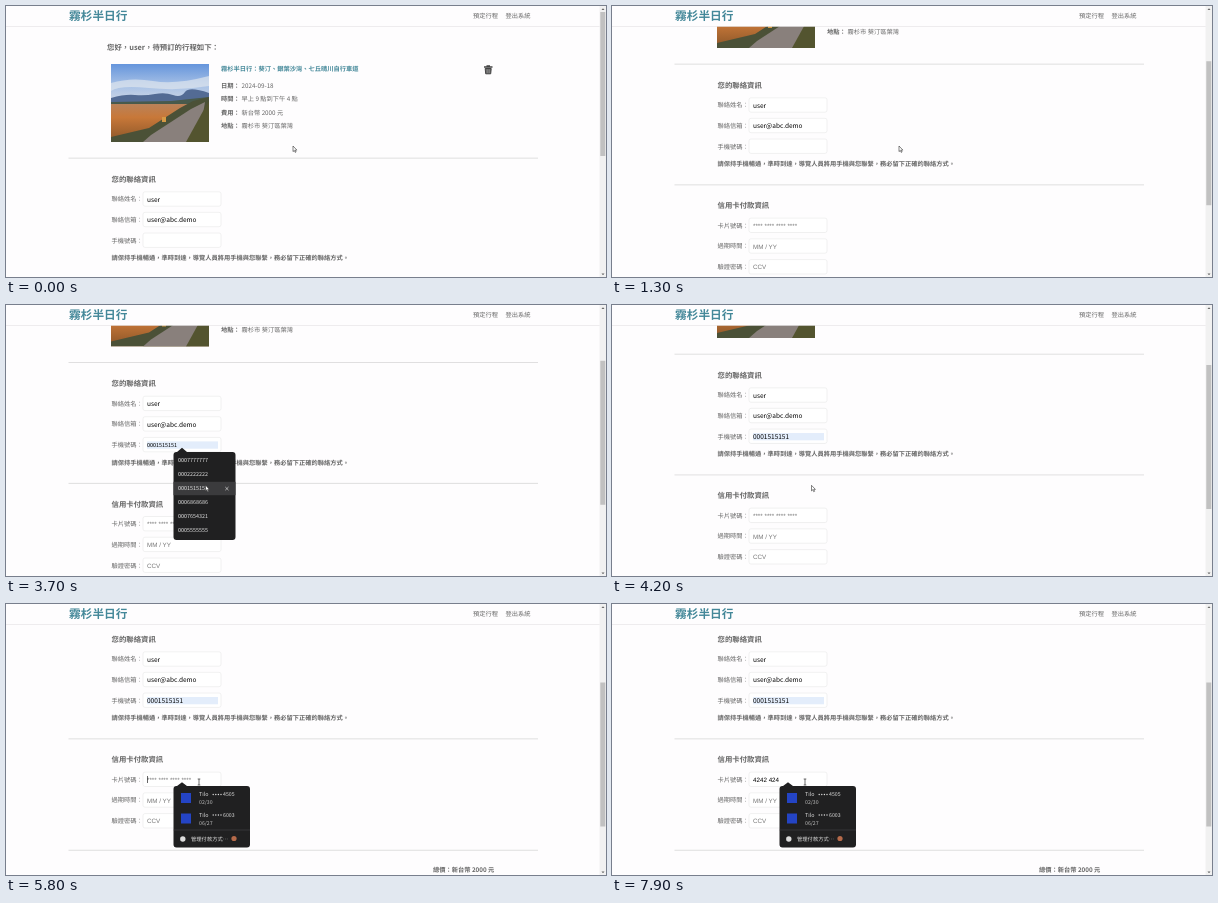
Recreate the animation shown at these times as an HTML page. Size 600 by 271 pixels, loop 8000 ms.

```html
<!DOCTYPE html>
<html lang="zh-Hant">
<head>
<meta charset="utf-8">
<style>
html, body { margin: 0; width: 100%; height: 100%; overflow: hidden; background: #fefdfe; }
svg { display: block; }
text { font-family: "Noto Sans CJK TC", "Noto Sans TC", "Noto Sans", sans-serif; text-rendering: geometricPrecision; white-space: pre; }
.arial { font-family: "Liberation Sans", Arial, sans-serif; }
</style>
</head>
<body>
<svg id="stage" width="600" height="271" viewBox="0 0 600 271">
  <defs>
    <linearGradient id="sky" x2="0" y2="1">
      <stop offset="0" stop-color="#6595dc"/><stop offset=".55" stop-color="#a9c2e6"/><stop offset="1" stop-color="#d3d9e4"/>
    </linearGradient>
    <linearGradient id="field" x2="0" y2="1">
      <stop offset="0" stop-color="#b9825a"/><stop offset=".35" stop-color="#c87839"/><stop offset="1" stop-color="#8a5528"/>
    </linearGradient>
    <clipPath id="frame"><path d="M105 58h98v78h-98z"/></clipPath>
  </defs>
  <g id="page">
    <g clip-path="url(#frame)">
      <path fill="url(#sky)" d="M105 58h98v40h-98z"/>
      <path fill="#dfe5ee" opacity=".7" d="M105 77q20-6 42-2t56-5v10q-30 5-60 2t-38 3z"/>
      <path fill="#536b94" d="M105 92q14-4 24-3t20-1 18 1 12-3 24 1v12h-98z"/>
      <path fill="#485a4c" d="M105 96l60-1 38-4v9h-98z"/>
      <path fill="url(#field)" d="M105 98h98v38h-98z"/>
      <path fill="#4b5137" d="M203 91l-16 4-13 7-31 20-38 9v5h98z"/>
      <path fill="#89807c" d="M199 96l-14 7-40 26-8 7h47l12-22z"/>
      <path fill="#53542f" d="M203 95l-7 12-16 29h23z"/>
      <path fill="#d69a45" d="M156 111h4v5h-4z"/>
    </g>
    <g fill="none" stroke="#444">
      <path stroke-width="1.3" d="M478 61h8.500M480.500 60h3.500"/>
      <path fill="#666" d="M479.200 62.500l.5 5.300h5l.5-5.300z"/>
      <path stroke="#aaa" stroke-width=".5" d="M481.200 63.300v3.700M483.200 63.300v3.700"/>
    </g>
  </g>
  <g id="header"><path fill="#fefdfe" d="M0 0h594v20H0z"/><path fill="#e8e7e8" d="M0 20h594v.8H0z"/></g>
  <g id="bar">
    <path fill="#f1f1f1" d="M593.500 0h6.500v271h-6.500z"/>
    <path fill="#666" d="M595.500 4l1.500-1.800 1.500 1.800zM595.500 267.500l1.500 1.800 1.500-1.800z"/>
    <path id="thumb" fill="#c1c1c1" d="M594.300 6h5v144h-5z"/>
  </g>
  <g id="phones"><path fill="#202021" d="M171 147l5-4.200 5 4.200h45.500q3 0 3 3v82q0 3-3 3h-56q-3 0-3-3v-82q0-3 3-3z"/></g>
  <g id="cards">
    <path fill="#202021" d="M171 182l5-3.700 5 3.700h60q3 0 3 3v55.500q0 3-3 3h-70.500q-3 0-3-3v-55.500q0-3 3-3z"/>
    <path fill="#4a4a4b" d="M167.500 225.700h76.500v.6h-76.500z"/>
    <circle cx="176.800" cy="235" r="2.700" fill="#ddd"/>
    <circle cx="228" cy="234.500" r="2.600" fill="#b56a4a"/>
  </g>
  <path id="arrow" d="M0 0v5.600l1.300-1.200.9 2 .9-.4-.9-1.900h1.700z" fill="#fff" stroke="#333" stroke-width=".6"/>
  <path id="beam" d="M-1.300-3h2.600M0-3v6M-1.300 3h2.600" fill="none" stroke="#333" stroke-width=".7"/>
</svg>
<script>
const $ = id => document.getElementById(id);
const page = $('page'), phones = $('phones'), cards = $('cards');

function add(parent, tag, attrs) {
  const el = document.createElementNS('http://www.w3.org/2000/svg', tag);
  for (const k in attrs) el.setAttribute(k, attrs[k]);
  parent.append(el);
  return el;
}
// y is the middle of the line
function write(parent, str, x, y, size = 6.25, fill = '#666', weight = 400, cls = '') {
  const el = add(parent, 'text', { x, y: y + size * .37, 'font-size': size, fill, 'font-weight': weight, class: cls });
  el.textContent = str;
  return el;
}
const rect = (parent, x, y, width, height, fill, more) => add(parent, 'rect', { x, y, width, height, fill, ...more });
const show = (el, on) => el.setAttribute('visibility', on ? 'visible' : 'hidden');
const move = (el, x, y) => el.setAttribute('transform', `translate(${x} ${y})`);

// Header
write($('header'), '霧杉半日行', 63, 10, 11.7, '#448899', 700);
write($('header'), '預定行程', 467, 10);
write($('header'), '登出系統', 499.5, 10);

// Booking
write(page, '您好，user，待預訂的行程如下：', 101, 41.5, 7.4, '#666', 700);
write(page, '霧杉半日行：葵汀、銀葉沙灣、七丘晴川自行車道', 215, 62.5, 6.25, '#448899', 700);
[['日期：', '2024-09-18'], ['時間：', '早上 9 點到下午 4 點'], ['費用：', '新台幣 2000 元'], ['地點：', '霧杉市 葵汀區葉灣']]
  .forEach(([label, value], i) => {
    const y = 79.7 + i * 13.3;
    write(page, label, 215, y, 6.25, '#666', 700);
    write(page, value, 235.5, y);
  });
for (const y of [151.7, 272.5, 383.8]) rect(page, 62.5, y, 469.5, .8, '#d8d8d8');

// Forms
function field(label, y, value, fill, weight, cls) {
  write(page, label, 105.5, y);
  rect(page, 137, y - 7.2, 78, 14.4, '#fff', { rx: 2, stroke: '#e8e8e8', 'stroke-width': .6 });
  return write(page, value, 141, y + .3, 6.25, fill, weight, cls);
}
write(page, '您的聯絡資訊', 105.5, 173, 7.4, '#666', 700);
field('聯絡姓名：', 193, 'user', '#000', 500).setAttribute('font-size', 6.5);
field('聯絡信箱：', 213.5, 'user@abc.demo', '#000', 500).setAttribute('font-size', 6.5);
const phone = field('手機號碼：', 234.2, '', '#000', 400);
const tint = rect(page, 141, 231, 71, 7.3, '#e3edfb');
page.insertBefore(tint, phone);
write(page, '請保持手機暢通，準時到達，導覽人員將用手機與您聯繫，務必留下正確的聯絡方式。', 105.5, 252, 6.25, '#666', 700);
write(page, '信用卡付款資訊', 105.5, 293.7, 7.4, '#666', 700);
const card = field('卡片號碼：', 313.3, '', '#757575', 400, 'arial');
field('過期時間：', 334, 'MM / YY', '#757575', 400, 'arial');
field('驗證密碼：', 354.8, 'CCV', '#757575', 400, 'arial');
const caret = rect(page, 141, 310, .6, 7, '#000');
write(page, '總價：新台幣 2000 元', 427, 403.7, 6.25, '#666', 700);

// Suggestion lists
const numbers = ['0007777777', '0002222222', '0001515151', '0006868686', '0007654321', '0005555555'];
const hover = add(phones, 'g', {});
rect(hover, 167.5, 176.8, 62, 13.4, '#3b3b3d');
add(hover, 'path', { d: 'M219.300 182l3.200 3.200m0-3.200l-3.200 3.200', stroke: '#ddd', 'stroke-width': .7 });
numbers.forEach((n, i) => write(phones, n, 172, 155.5 + i * 14, 5.4, '#e0e0e0'));
[['4505', '02/30'], ['6003', '06/27']].forEach(([digits, date], i) => {
  const y = 190.5 + i * 20.5;
  rect(cards, 175, y - 1.5, 10, 10, '#2444c4');
  write(cards, 'Tilo', 193, y, 5.4, '#e0e0e0');
  for (let k = 0; k < 4; k++) add(cards, 'circle', { cx: 207.2 + k * 2.6, cy: y, r: .7, fill: '#e0e0e0' });
  write(cards, digits, 217, y, 5.2, '#e0e0e0');
  write(cards, date, 193, y + 8, 5.2, '#c0c0c0');
});
write(cards, '管理付款方式…', 185, 235, 5.3, '#e0e0e0');

// Linear track through [time, value] points
function track(points, t) {
  let [t0, v0] = points[0];
  for (const [t1, v1] of points) {
    if (t < t1) return v0 + (v1 - v0) * Math.max(0, (t - t0) / (t1 - t0));
    [t0, v0] = [t1, v1];
  }
  return v0;
}
const scrollPath = [[300, 0], [800, 42], [1300, 94], [1400, 94.6], [4100, 94.6], [4600, 136.4], [4700, 138]];
const xPath = [[1400, 287], [1800, 196], [2700, 196], [3000, 199.5], [5000, 199.5], [5300, 193]];
const yPath = [[1400, 140], [1800, 140], [2700, 140], [2900, 155], [3300, 194], [3500, 180.3], [5000, 180.3], [5300, 178]];

function draw(t) {
  const scroll = track(scrollPath, t), x = track(xPath, t), y = track(yPath, t);
  move(page, 0, -scroll);
  move($('thumb'), 0, scroll * .525);

  const listOpen = t >= 2300 && t < 4000;
  const row = listOpen && y > 148 ? Math.floor((y - 148.5) / 14) : -1;
  const chosen = t >= 4000;
  show(phones, listOpen);
  show(hover, listOpen && row >= 0);
  move(hover, 0, (row - 2) * 14);
  show(tint, chosen || row >= 0);
  phone.textContent = chosen ? numbers[2] : numbers[row] || '';
  phone.setAttribute('font-size', chosen ? 6.5 : 5.4);

  const typed = '4242424'.slice(0, Math.max(0, Math.floor((t - 6300) / 220)));
  card.textContent = typed.replace(/^(\d{4})(?=\d)/, '$1 ') || '**** **** **** ****';
  card.setAttribute('fill', typed ? '#000' : '#757575');
  show(cards, t >= 5500);
  show(caret, t >= 5400 && !typed && (t - 5300) % 1000 < 600);

  const overField = t >= 1800 && t < 2800 || t >= 5200;
  show($('arrow'), !overField);
  show($('beam'), overField);
  move($(overField ? 'beam' : 'arrow'), x, y);
}

// The screen refreshes ten times a second
function tick() {
  draw(Math.floor(performance.now() % 8000 / 100) * 100);
  requestAnimationFrame(tick);
}
tick();
</script>
</body>
</html>
```
